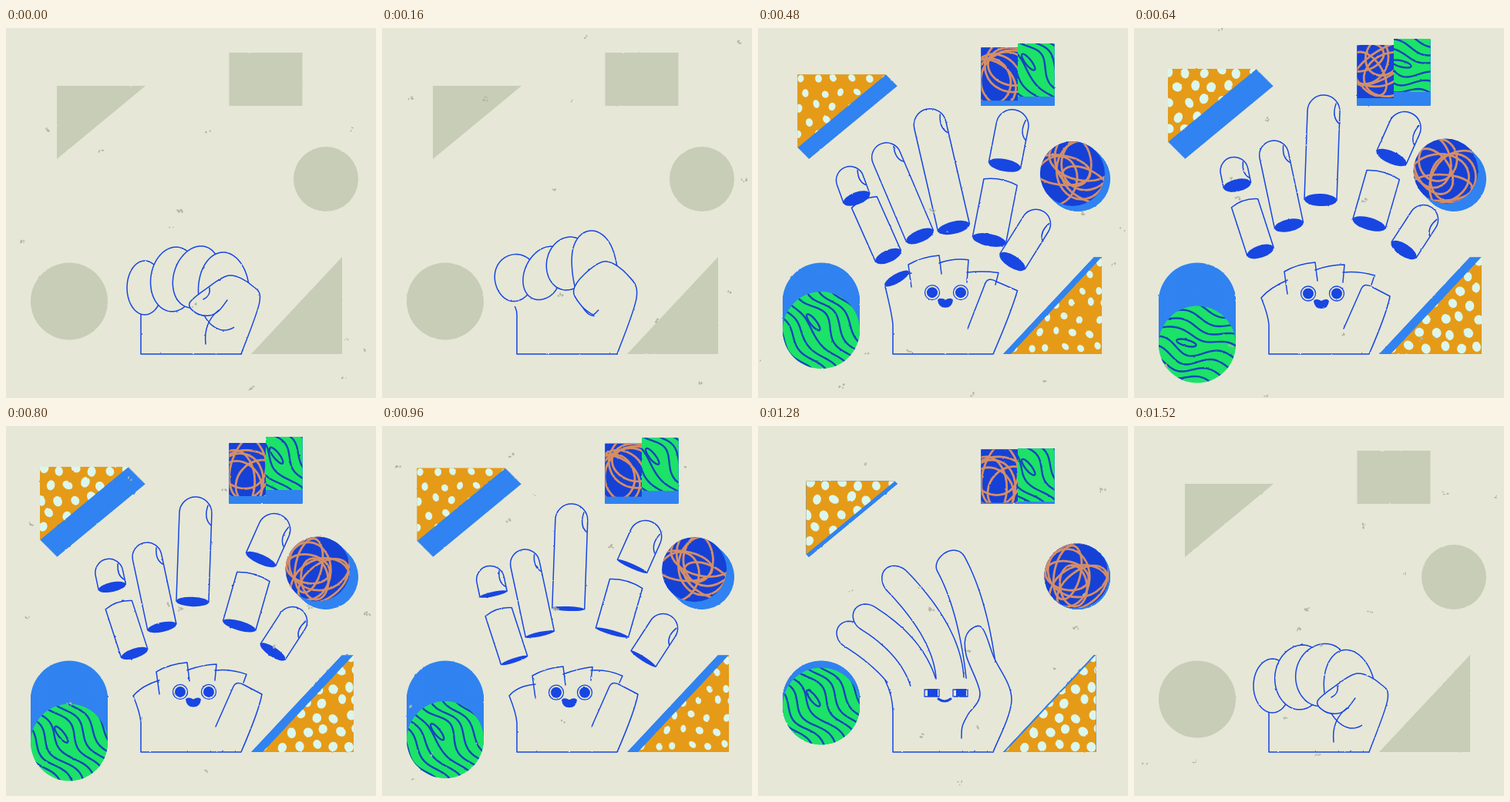
Recreate the animation shown at these times as an HTML page with a canvas. Size 480 by 480 pixels, loop 1600 ms.

```html
<!DOCTYPE html>
<html lang="en">
<head>
<meta charset="utf-8">
<title>Hand and shapes</title>
<style>
html, body { margin: 0; width: 100%; height: 100%; overflow: hidden; background: #e6e7d7; }
canvas { display: block; width: 480px; height: 480px; filter: url(#rough); }
svg { position: absolute; }
</style>
</head>
<body>
<svg width="0" height="0"><filter id="rough" x="0" y="0" width="1" height="1" color-interpolation-filters="sRGB">
<feTurbulence id="noise" type="fractalNoise" baseFrequency=".2" numOctaves="2" result="n"/>
<feDisplacementMap in="SourceGraphic" in2="n" scale="1.8" xChannelSelector="R" yChannelSelector="G"/>
</filter></svg>
<canvas width="480" height="480"></canvas>
<script>
const ctx = document.querySelector('canvas').getContext('2d');
const noise = document.getElementById('noise');
const PAPER = '#e6e7d7', INK = '#1746e2', SAGE = '#c7cdb6', SIDE = '#3083f0';
const STEP = 80, COUNT = 20, TAU = Math.PI * 2, RAD = TAU / 360;

let state = 1;
const seed = n => { state = n * 9973 + 17; for (let j = 0; j < 5; j++) rnd(); };
const rnd = () => (state = state * 16807 % 2147483647) / 2147483647;
const clamp = (v, lo = 0, hi = 1) => Math.max(lo, Math.min(hi, v));
const mix = (a, b, u) => a.map((v, j) => v + (b[j] - v) * u);

function line(d, width = 1.5) {
  ctx.lineWidth = width;
  ctx.stroke(new Path2D(d));
}
function outline(d) {
  ctx.fillStyle = PAPER;
  ctx.fill(new Path2D(d));
  line(d);
}
function blob(x, y, rx, ry, deg = 0, color = INK) {
  ctx.fillStyle = color;
  ctx.beginPath();
  ctx.ellipse(x, y, rx, ry, deg * RAD, 0, TAU);
  ctx.fill();
}

// Background shapes

function dots(phase) {
  const size = phase == 0 ? 3.6 : 5;
  for (let r = -1; r < 8; r++) for (let c = -1; c < 7; c++)
    blob(c * 22 + (r & 1) * 10 + rnd() * 6, r * 19 + rnd() * 7, size + rnd(), size + 1 + rnd(), rnd() * 90 - 60, '#dbf6ec');
}
function scribble() {
  ctx.strokeStyle = '#d58e66';
  ctx.lineWidth = 2.8;
  for (let j = 0; j < 7; j++) {
    ctx.beginPath();
    ctx.ellipse(rnd() * 44 - 22, rnd() * 44 - 22, 26 + rnd() * 20, 16 + rnd() * 24, rnd() * 3, 0, TAU);
    ctx.stroke();
  }
}
function grain(phase) {
  ctx.strokeStyle = '#1546bd';
  ctx.lineWidth = 2.4;
  ctx.rotate(phase == 2 ? .25 : .9);
  for (let d = -65; d <= 65; d += 13) {
    ctx.beginPath();
    for (let s = -72; s <= 72; s += 4) {
      const bulge = Math.sign(d + 1) * 7 * Math.exp(-((s + 12) ** 2) / 500 - d * d / 900);
      ctx.lineTo(s, d + 6 + bulge + 5 * Math.sin(s / 12 + d / 25 + phase));
    }
    ctx.stroke();
  }
  ctx.beginPath();
  ctx.ellipse(-14, 2, 13, 4, 0, 0, TAU);
  ctx.stroke();
}

const disc = (x, y, r) => `M${x - r} ${y}a${r} ${r} 0 1 1 ${2 * r} 0a${r} ${r} 0 1 1 ${-2 * r} 0z`;
// Outline, travel, front colour, texture, texture origin.
const shapes = [
  ['M66 75H181L66 170z', -22, -22, '#e59b18', dots, 66, 75],
  ['M289.500 32H337V101H289.500z', 0, -10, '#1641d6', scribble, 315, 66],
  ['M337 32H384.500V101H337z', 0, -18, '#1ce268', grain, 361, 66],
  [disc(415, 196, 42), -10.5, -10.5, '#1641d6', scribble, 415, 196],
  [disc(82, 354.5, 50), 0, 56, '#1ce268', grain, 82, 354],
  ['M436 297V423H318z', 15, 0, '#e59b18', dots, 318, 297]
].map(([d, ...rest]) => [new Path2D(d), ...rest]);

// Fast rise, rest, then accelerating fall.
const depth = i => clamp(Math.min(
  1 - (1 - clamp((i - 4) / 4)) ** 1.6,
  1 - clamp((i - 10.5) / 6) ** 2));

function drawShape([path, dx, dy, color, texture, x, y], i) {
  const k = depth(i), slices = 40;
  ctx.save();
  ctx.fillStyle = k ? SIDE : SAGE;
  if (k) {
    for (let s = 0; s < slices; s++) {
      ctx.fill(path);
      ctx.translate(dx * k / slices, dy * k / slices);
    }
    ctx.fillStyle = color;
  }
  ctx.fill(path);
  if (k) {
    ctx.clip(path);
    ctx.translate(x, y);
    seed(i % 3 + x);
    texture(i % 3);
  }
  ctx.restore();
}

// Whole hand: each finger is a bent spine (root, bend, tip) and a half width.

const straight = (x, y, tx, ty, w) => [x, y, (x + tx) / 2, (y + ty) / 2, tx, ty, w];
const fist = {
  fingers: [
    straight(203, 337, 157, 337, 35), straight(248, 330, 188, 322, 42),
    straight(275, 332, 219, 314, 41), straight(284, 392, 281, 291, 33)
  ],
  thumb: [305,423, 329,355, 319,334, 290,321, 260,338, 238,357, 247,370, 264,373, 276,367, 287,353]
};
const half = {
  fingers: [
    [175,309, 152,279, 114,273, 18], [183,324, 184,290, 189,259, 22],
    [242,251, 222,251, 200,255, 17], [278,315, 262,235, 230,180, 18]
  ],
  thumb: [305,423, 334,333, 318,280, 291,248, 272,262, 280,295, 297,335, 288,360, 270,386, 262,405]
};
const wave = {
  fingers: [
    [181,322, 155,290, 104,261, 17], [214,332, 197,278, 125,239, 17],
    [249,327, 245,262, 165,186, 18], [290,325, 278,220, 242,165, 20]
  ],
  thumb: [305,423, 329,355, 306,300, 290,261, 271,270, 270,297, 288,347, 272,375, 265,390, 264,405]
};
const tight = {
  fingers: fist.fingers.map(([x, y, bx, by, tx, ...rest], f) => [x, y, bx, by, tx - 2 - 3 * f, ...rest]),
  thumb: fist.thumb
};

// Outline of a finger; curl turns the capsule into a closed knuckle.
function fingerPath([x0, y0, x1, y1, x2, y2, w], curl) {
  const len = Math.hypot(x1 - x0, y1 - y0) + Math.hypot(x2 - x1, y2 - y1);
  const right = [], left = [];
  for (let a = 0; a <= 180; a += 5) {
    const t = (1 - Math.cos(a * RAD)) / 2, s = 1 - t;
    const x = s * s * x0 + 2 * s * t * x1 + t * t * x2, y = s * s * y0 + 2 * s * t * y1 + t * t * y2;
    const dx = s * (x1 - x0) + t * (x2 - x1), dy = s * (y1 - y0) + t * (y2 - y1);
    const cap = Math.sqrt(1 - (1 - Math.min(1, s * len / w)) ** 2);
    const r = w * (cap + (Math.sin(a * RAD) - cap) * curl) / Math.hypot(dx, dy);
    right.push([x - dy * r, y + dx * r]);
    left.unshift([x + dy * r, y - dx * r]);
  }
  return 'M' + right.concat(left).map(p => p.join(' ')).join('L');
}

// Smooth open curve through x,y pairs.
function curve(p) {
  const at = (k, c) => p[2 * clamp(k, 0, p.length / 2 - 1) + c];
  let d = `M${p[0]} ${p[1]}`;
  for (let k = 0; k < p.length / 2 - 1; k++) {
    const ctrl = (c, j, s) => at(j, c) + s * (at(j + 1, c) - at(j - 1, c)) / 6;
    d += `C${ctrl(0, k, 1)} ${ctrl(1, k, 1)} ${ctrl(0, k + 1, -1)} ${ctrl(1, k + 1, -1)} ${at(k + 1, 0)} ${at(k + 1, 1)}`;
  }
  return d;
}

function drawWhole(i) {
  const opening = i < 5;
  const u = opening ? (i / 4) ** 2 : Math.max(-.1, Math.sin((i - 16) / 3 * TAU / 4));
  const [from, to] = opening ? [fist, half] : [wave, tight];
  const curl = clamp(opening ? 1 - u : u), open = 1 - curl;
  line(`M305 423H175V372Q175 ${372 - 22 * open} ${175 - 10 * open} ${372 - 42 * open}`);
  from.fingers.forEach((f, j) => outline(fingerPath(mix(f, to.fingers[j], u), curl)));
  outline(curve(mix(from.thumb, to.thumb, u)));
  if (curl > .8) line('M264 337Q266 347 256 352M276 366Q256 382 259 410');
  if (opening && open > .5) {
    line('M164 316Q182 328 205 312M123 267Q130 262 139 263M170 295Q184 280 194 294M170 304Q180 307 190 303' +
      'M207 245L223 240M202 316L204 347M222 275Q233 300 236 328M260 315V335M249 190Q254 201 265 202' +
      'M294 254Q296 270 309 274M294 326L311 327L300 333M258 302Q265 306 272 301L262 306');
    blob(173, 327, 8, 4, -30);
    blob(246, 301, 11, 4, -10);
    drawFace('shut');
  }
  if (!opening && open > .3) drawFace(u > 0 ? 'shut' : 'half');
}

// Hand in pieces: base and lean when close, then when far, then length and half width.

const pieces = [
  [[169, 296, -24], [164, 290, -18], 66, 18],
  [[300, 275, 11], [305, 254, 16], 66, 22],
  [[128, 221, -20], [134, 204, -12], 37, 18, 'tip'],
  [[210, 270, -23], [201, 256, -12], 112, 19, 'tip'],
  [[254, 259, -13], [242, 223, 2], 136, 21, 'tip'],
  [[320, 178, 11], [334, 168, 24], 63, 21, 'tip'],
  [[330, 303, 32], [350, 288, 33], 66, 19, 'tip']
];

function drawPiece(x, y, lean, len, w, cut, tip) {
  ctx.save();
  ctx.translate(x, y);
  ctx.rotate(lean * RAD);
  const top = w - len;
  outline(tip ? `M${-w} 0L${-w} ${top}A${w} ${w} 0 0 1 ${w} ${top}L${w} 0` : `M${-w} 0V${-len}Q0 ${-len - 7} ${w} ${-len}V0`);
  blob(0, 0, w, cut);
  if (tip) line(`M${w * .75} ${top - w * .5}Q${w * .5} ${top + w * .3} ${w * .95} ${top + w * .7}`);
  ctx.restore();
}

function drawApart(i) {
  const spread = Math.min(1, (i - 6) / 2);
  const sink = clamp((i - 8) / 4, 0, 2) ** 1.5;
  const lift = 9 * (spread - 1), d = lift + 8 * Math.min(1, sink);
  drawPalm(d, lift);
  drawFace(spread < 0 ? 'half' : 'open', d * .15);
  for (const [close, far, len, w, tip] of pieces) {
    const [x, y, lean] = mix(close, far, spread);
    drawPiece(x + (240 - x) * .1 * sink, y + 14 * sink, lean, len * (1.16 - .16 * spread), w,
      Math.max(1, 8 - 5 * sink), tip);
  }
}

function drawPalm(d, lift) {
  const left = 350 + lift * 1.6, thumb = lift * .8;
  line(`M175 423V385Q174 372 165 ${left}Q176 ${left - 13} 199 ${327 + d}` +
    `M199 ${345 + d}L195 ${316 + d}Q212 ${306 + d} 235 ${304 + d}L238 ${328 + d}` +
    `M235 ${314 + d}Q254 ${307 + d} 273 ${307 + d * .7}L271 330M271 317Q292 315 312 ${321 + d * .4}L308 333` +
    `M272 390L295 ${338 + thumb}Q299 ${330 + thumb} 309 ${336 + thumb}L${332 - lift * .5} ${348 + thumb}Q328 370 305 423H175`);
  if (lift < -5) blob(180, 325, 18, 6, -30);
}

function drawFace(mood, dy = 0) {
  for (const x of [226, 263]) {
    if (mood == 'open') {
      line(disc(x, 344.5 + dy, 9.5), 1.3);
      blob(x, 344.5 + dy, 7, 7);
    } else if (mood == 'half') {
      line(`M${x - 10} 342h19v9h-19z`, 1.3);
      ctx.fillStyle = INK;
      ctx.fillRect(x - 6, 341, 13, 10);
    } else line(`M${x - 9} 346q9 -2 19 -1`);
  }
  if (mood == 'open') {
    ctx.fillStyle = INK;
    ctx.fill(new Path2D(`M233 ${354 + dy}q3 -4 10 0q7 -4 10 0q-1 10 -10 10q-9 0 -10 -10`));
  } else line('M234 354Q242 360 250 354', mood == 'half' ? 3 : 1.5);
}

function drawSpecks(i) {
  seed(i + 40);
  const speck = (x, y, n) => {
    for (; n > 0; n--) blob(x + rnd() * 7 - 3, y + rnd() * 5 - 2, .5 + rnd() * 1.6, .5 + rnd(), rnd() * 180, '#b2b6a2');
  };
  for (let j = 0; j < 11; j++) speck(rnd() * 480, rnd() * 480, 1 + rnd() * 4);
  if (i % 3 < 2) speck(225, 237, 7);
}

function draw(i) {
  noise.setAttribute('seed', i % 3 + 1);
  ctx.fillStyle = PAPER;
  ctx.fillRect(0, 0, 480, 480);
  for (const s of shapes) drawShape(s, i);
  ctx.strokeStyle = INK;
  ctx.lineJoin = ctx.lineCap = 'round';
  (i < 5 || i > 14 ? drawWhole : drawApart)(i);
  drawSpecks(i);
}

let shown = -1;
function tick() {
  const i = Math.floor(performance.now() / STEP) % COUNT;
  if (i != shown) draw(shown = i);
  requestAnimationFrame(tick);
}
tick();
</script>
</body>
</html>
```
